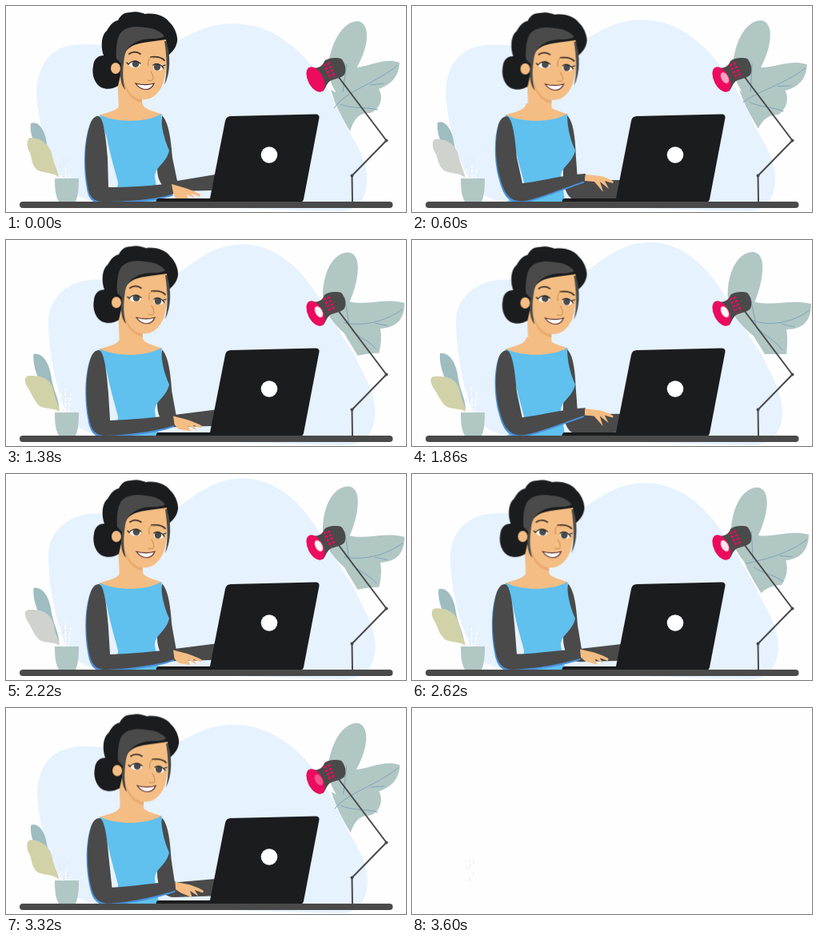
Recreate the animation shown at these times as an HTML page without scripts. Size 500x258 px, loop 3620 ms.

```html
<!DOCTYPE html>
<html lang="en">
<head>
<meta charset="utf-8">
<title>Working at a desk</title>
<style>
  html, body { margin: 0; width: 100%; height: 100%; overflow: hidden; background: #fefefe; }
  svg { display: block; width: 500px; height: 258px; }

  /* Shapes morph between --a and --b: sway once per loop, type three times. */
  .sway, .type, .lean, .bulb, .scene, .tint {
    animation: 3.62s cubic-bezier(.364, 0, .636, 1) infinite;
  }
  .sway { animation-name: sway; }
  .type { animation-name: type; }
  .lean { animation-name: lean; }
  .bulb { animation-name: glow; animation-timing-function: linear; }
  .scene { animation-name: cut; animation-timing-function: step-end; }
  .tint { animation-name: tint; animation-timing-function: step-end; }

  @keyframes sway {
    0%, 99.45%, 100% { d: var(--a); }
    49.72% { d: var(--b); }
  }
  @keyframes type {
    0%, 33.15%, 66.3%, 99.45%, 100% { d: var(--a); }
    16.575%, 49.72%, 82.87% { d: var(--b); }
  }
  @keyframes lean {
    0%, 33.15%, 66.3%, 99.45%, 100% { transform: none; }
    16.575%, 49.72%, 82.87% { transform: translate(4.5px, .8px); }
  }
  @keyframes glow {
    0%, 99.45%, 100% { opacity: 0; }
    16.6%, 82.9% { opacity: .65; }
    30%, 70% { opacity: 1; }
  }
  @keyframes cut { 0% { opacity: 1; } 99.44%, 100% { opacity: 0; } }
  @keyframes tint {
    0%, 20%, 64%, 100% { fill: #d1d2a8; }
    14%, 59% { fill: #d0d2ce; }
  }

  .blob { fill: #e6f2fe; }
  .leaf { fill: #b1c7c4; }
  .vein { fill: none; stroke: #7fa4b8; stroke-width: 1; }
  .skin { fill: #f4bd83; }
  .hair { fill: #1b1c1e; }
  .grey { fill: #4a4a4a; }
  .dress { fill: #60c0ee; }
  .rim { fill: #4a90d9; transform: translate(-1.2px, 2.5px); }
  .line { fill: none; stroke: #4a4a4a; stroke-linecap: round; stroke-linejoin: round; }
</style>
</head>
<body>
<svg viewBox="0 0 500 258">
  <g class="scene">
    <path class="blob sway" style="
      --a:path('M95 48C66 48 40 62 38 108C40 150 53 185 68 215C80 245 120 250 180 250C260 252 380 257 420 257C440 256 452 240 451 213C448 180 430 165 420 140C403 100 385 72 355 48C330 28 305 22 283 22C244 22 225 42 195 52C160 56 130 48 95 48Z');
      --b:path('M110 50C88 51 56 66 55 102C56 145 64 185 76 215C88 245 128 250 185 250C265 252 385 257 425 257C450 256 464 240 463 212C461 185 446 165 437 143C412 108 394 68 368 38C346 14 322 3 297 3C262 3 238 24 205 50C170 54 140 48 110 50Z')"/>

    <!-- Large plant -->
    <path class="leaf sway" style="
      --a:path('M427 125C400 100 400 75 407 55C415 30 428 19 440 19C452 21 453 38 449 52C445 66 440 74 436 82Z');
      --b:path('M440 130C405 105 392 85 395 60C398 30 412 15 426 15C438 16 440 30 437 48C434 64 430 74 427 80Z')"/>
    <path class="leaf sway" style="
      --a:path('M412 108C420 92 430 80 438 77C455 76 472 64 492 71C491 88 482 98 466 104C474 118 464 133 454 134C438 134 434 146 430 157C420 140 412 125 406 105Z');
      --b:path('M418 108C416 90 420 78 425 76C445 85 472 73 499 80C499 100 490 112 468 112C469 118 470 130 468 143C458 143 448 143 441 143C434 131 425 118 418 104Z')"/>
    <path class="vein sway" style="
      --a:path('M426 72L421 108M410 128C425 106 462 97 490 74M418 123C432 129 448 126 465 130M455 99L472 97');
      --b:path('M423 72L430 106M424 100C447 109 475 104 497 88M434 112C444 122 452 124 463 138M462 105L478 109')"/>

    <!-- Potted plant -->
    <path class="sway" fill="#9fbcc0" style="
      --a:path('M63 212C45 195 28 165 31 147C40 143 49 155 51 172C54 190 62 200 63 212Z');
      --b:path('M67 212C50 195 33 165 35 142C47 140 56 155 58 175C61 190 67 200 67 212Z')"/>
    <g class="tint">
      <path class="sway" style="
        --a:path('M66 215C60 208 50 210 40 206C30 198 34 190 28 180C25 172 27 166 30 165C42 165 55 172 58 188C60 200 66 208 66 215Z');
        --b:path('M67 215C60 210 50 213 42 208C34 200 32 192 26 184C22 176 23 172 27 171C42 170 56 172 60 190C62 203 67 208 67 215Z')"/>
    </g>
    <path class="sway" fill="none" stroke="#fff" stroke-width="1.700" stroke-opacity=".75" stroke-dasharray="5 2" style="
      --a:path('M70 216L67 208M75 216L75 204M79 216L81 209');
      --b:path('M71 216L68 190M75 216L74 184M78 216L81 190')"/>
    <path class="leaf" d="M61 216H91C91 230 90 238 87 245H66C62 238 61 230 61 216Z"/>

    <!-- Lamp -->
    <path class="line" stroke-width="2" d="M415 88L475.500 168.500L432.500 212.500L433 246"/>
    <g class="grey">
      <circle cx="475.500" cy="168.500" r="2"/>
      <circle cx="432.500" cy="212.500" r="2"/>
      <path d="M378 77C388 79 395 77 398 69C402 65 413 64 419 66C424 71 426 80 423 86C418 91 410 91 405 94C400 98 400 103 396 107Z"/>
    </g>
    <ellipse cx="387" cy="92" rx="9.500" ry="17" transform="rotate(-28 387 92)" fill="#ec0b5e"/>
    <ellipse class="bulb" cx="391" cy="90" rx="4.300" ry="7.500" transform="rotate(-28 391 90)" fill="#fff5f7"/>
    <path d="M398 73L406 91M403 71L411 89" fill="none" stroke="#ec0b5e" stroke-width="3.500" stroke-dasharray="2.500 2.300"/>

    <!-- Woman -->
    <path class="skin" d="M116 137C130 132 141 131 143 122H171C170 128 182 131 196 136C175 150 135 150 116 137Z"/>
    <g class="lean">
      <path class="skin" d="M139 85L141 130C150 137 163 136 170 129V108Z"/>
      <path class="hair" d="M140 100C134 104 126 105 119 102C110 97 107 85 109 75C110 66 115 62 122 62C117 48 121 34 126 31C130 24 134 19 140 18C143 12 147 8 155 8C163 6 169 8 174 10C187 8 199 13 204 20C211 26 215 38 214 44C213 52 208 57 203 62L188 45L148 65Z"/>
      <ellipse class="skin" cx="137" cy="78" rx="6" ry="7"/>
      <path class="skin" d="M146 66C149 52 160 47 178 45L200 42C202 62 201 84 196 98C190 112 180 118 171 117C156 114 145 103 143 87Z"/>
      <path fill="#e9ab70" d="M147 92C151 107 160 117 170 117V121C158 119 148 109 147 92Z"/>
      <path class="grey" d="M138 66C137 52 139 40 143 34C150 26 162 25 174 27C186 28 194 32 198 38C190 43 182 39 168 43C156 47 150 53 148 64C146 78 145 90 149 105C143 98 142 88 144 72Z"/>
      <path class="grey" d="M200 44C206 60 206 84 198 99C202 83 201 62 198 44Z"/>
      <g fill="#fff">
        <ellipse cx="161" cy="73" rx="7" ry="4.300"/>
        <ellipse cx="190" cy="76.500" rx="6.300" ry="4.500"/>
      </g>
      <g class="grey">
        <circle cx="162" cy="72.500" r="4.300"/>
        <circle cx="189" cy="76.500" r="4.200"/>
      </g>
      <g class="line">
        <path stroke="#292522" stroke-width="1.300" d="M153 73C157 68 164 68 168 72M184 74C187 71 193 72 197 78M153 73L151 71M196 75L199 74"/>
        <path stroke="#3c302a" stroke-width="1.800" d="M154 60C158 57 163 57 168 60M181 64C188 63 194 64 198 68"/>
        <path stroke="#c88849" stroke-width="1" d="M178 75C176 65 182 63 184 65M181 82C186 91 185 95 177 93"/>
      </g>
      <path d="M162 97C170 99 178 99 185 97C181 107 169 107 162 97Z" fill="#fff" stroke="#582b27" stroke-width="1.200"/>
    </g>

    <path class="grey type" style="
      --a:path('M195 137C203 145 206 165 208 190L214 219L262 211L257 231L212 232C195 232 186 215 190 195Z');
      --b:path('M194 137C202 145 204 165 205 190L207 218L262 218L257 241L206 243C194 243 186 225 190 195Z')"/>
    <path class="dress" d="M117 136C135 146 175 147 194 135C194 150 197 165 204 181C200 198 187 200 186 214C188 228 192 240 190 246H118C130 235 141 230 140 221C136 205 131 190 126 165Z"/>
    <g style="
      --a:path('M116 138C122 140 125 165 127 190L128 227C155 227 185 225 207 222L210 235C190 242 150 245 125 245C110 246 104 240 102 225C97 195 99 165 106 146C108 141 112 137 116 138Z');
      --b:path('M119 138C126 142 129 165 131 190L138 222C165 219 190 211 217 210L216 219C190 228 160 240 142 244C122 247 115 234 110 215C104 195 103 165 109 146C111 141 115 138 119 138Z')">
      <path class="rim type"/>
      <path class="grey type"/>
    </g>
    <path class="skin type" style="
      --a:path('M207 223L224 228C232 231 238 233 243 236L242 239L232 235L236 241L226 236L228 241L212 241L209 234Z');
      --b:path('M217 211L236 213C244 215 249 218 252 220L251 222L241 219L246 229L235 220L239 233L228 220L216 219Z')"/>

    <!-- Laptop and desk -->
    <path class="hair" d="M191 241H256V247H188C187 244 188 241 191 241Z"/>
    <path class="hair" d="M281 138L387 135.500Q392 135.500 391.500 140L372 242Q371 246 367 246H254L274 144Q275 138 281 138Z"/>
    <circle cx="329" cy="186.500" r="10.300" fill="#fff"/>
    <rect class="grey" x="17" y="245" width="466.500" height="8" rx="4"/>
  </g>
  <path d="M68 198V203M72 190V194M77 190V195M73 196L71 202M77 206V210M72 212V217" stroke="#e6e9ec" stroke-width="1" fill="none"/>
</svg>
</body>
</html>
```
